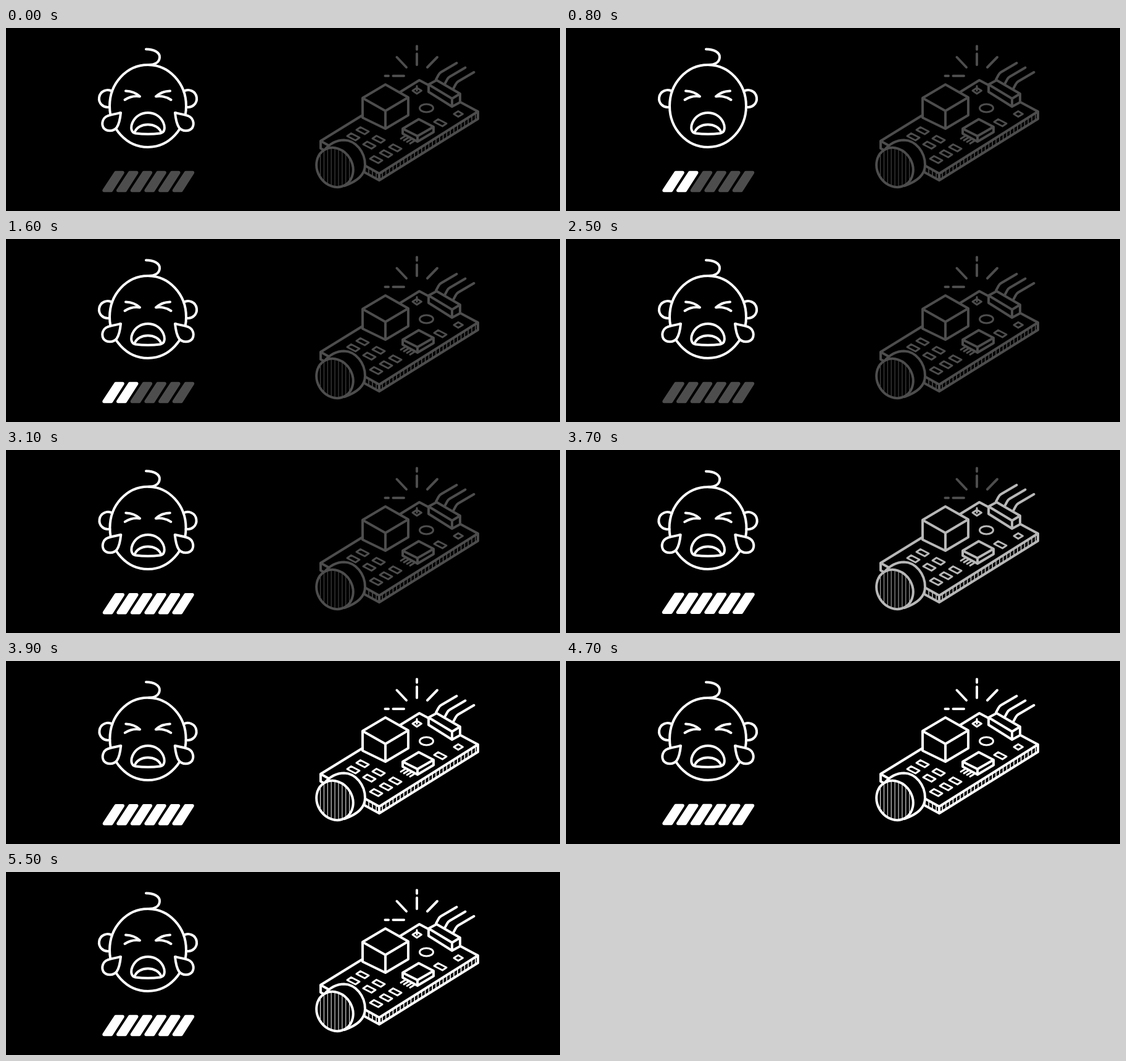
Animation, 898 px wide and 298 px high, one loop 6.9 s. Source, as an HTML page:

```html
<!DOCTYPE html>
<html lang="en">
<head>
<meta charset="utf-8">
<title>Cry detector</title>
<style>
  html, body { margin: 0; width: 100%; height: 100%; overflow: hidden; background: #000; }
  svg { display: block; width: 898px; height: 298px; }
  .line { fill: none; stroke-width: 4; stroke-linecap: round; stroke-linejoin: round; }
  .solid { fill: #000; }
  .thin { stroke-width: 1.6; }
  .hair { stroke-width: 1; }
  .part { stroke-width: 3; }
</style>
</head>
<body>
<svg viewBox="0 0 898 298">
  <defs>
    <ellipse id="micFace" cx="533" cy="227" rx="28.5" ry="33.2" transform="rotate(-30 533 227)"/>
    <clipPath id="micClip"><use href="#micFace"/></clipPath>
    <g id="side">
      <path d="M172 103A14 14 0 1 0 168 128.700"/>
      <path d="M194 102.500Q208 103 217 111.500Q204 109.500 192.500 117"/>
    </g>
    <path id="tear" d="M186 138C185 148 183 157 179.500 162C174 169 163 169 158 162.500C154 155 157 146 165 143C171 141 179 139.500 186 138Z"/>
  </defs>
  <g id="signal">
    <g class="line" stroke="#fff">
      <path d="M227 34.500C240 34.500 250 40 249 48.500C248 56 241 60 231 60"/>
      <ellipse cx="230" cy="127" rx="62" ry="67"/>
      <use href="#side"/>
      <use href="#side" transform="matrix(-1 0 0 1 460 0)"/>
      <path d="M210 171.500C202 170 202 161 205 154C210 143 220 138 230 138S250 143 255 154C258 161 258 170 250 171.500C238 173 222 173 210 171.500Z"/>
      <path d="M208.500 170C214 153 246 153 251.500 170"/>
      <g id="tears" class="solid">
        <use href="#tear"/>
        <use href="#tear" transform="matrix(-1 0 0 1 460 0)"/>
      </g>
    </g>
    <g id="bars" stroke-width="5.500" stroke-linejoin="round"></g>
  </g>
  <g id="sensor" class="line">
    <path d="M510 184L670 85L765 136L605 237ZV196L605 248L765 148V136M605 237V248"/>
    <path id="ticks" class="thin"/>
    <path id="pads" class="part"/>
    <path class="part" d="M659 102L666 97.500L673.500 102L666 107ZM666 94.500V102M726 140L733 135.500L740.500 140L733 144.500Z"/>
    <ellipse class="part" cx="681.500" cy="130.500" rx="11" ry="6.500"/>
    <path class="solid" d="M578 114L615 92L652 113V142L615 164L578 146ZM578 114L615 135M652 113L615 135M615 135V164"/>
    <path class="solid" d="M685 92L698 85L736 107V121L723 128L685 104ZM685 92L723 115M736 107L723 115M723 115V128"/>
    <path id="wires"/>
    <path class="solid" d="M643 164L669 148.500L693 161V169.500L667 185L643 172ZM643 164L667 176M693 161L667 176M667 176V185"/>
    <path id="pins" class="part"/>
    <path class="solid" d="M516 199C526 187 536 182.500 548 182.500C567 183 582 202 582 223C582 239 570 249 549 257"/>
    <use href="#micFace" class="solid"/>
    <path id="grille" class="hair" clip-path="url(#micClip)"/>
  </g>
  <path id="rays" class="line" d="M666 29.500V35M666 42V60M633.500 47.500L649 64M699 47.500L683 64M627.500 78H645M614.500 78H620"/>
</svg>
<script>
const LOOP = 6900, STEP = 100, GRAY = 77;
const OFF = `rgb(${GRAY},${GRAY},${GRAY})`, ON = '#fff';
const el = id => document.getElementById(id);
const repeat = (count, make) => Array.from({ length: count }, (_, i) => make(i));
const setPath = (id, pieces) => el(id).setAttribute('d', pieces.join(''));

const bars = repeat(6, i => {
  const bar = document.createElementNS('http://www.w3.org/2000/svg', 'path');
  bar.setAttribute('d', 'M178 235.5H189L170.500 264.5H159Z');
  bar.setAttribute('transform', `translate(${i * 22.7} 0)`);
  el('bars').append(bar);
  return bar;
});

setPath('ticks', [
  ...repeat(27, i => `M${610 + i * 5.8} ${233.8 - i * 3.66}v11`),
  ...repeat(4, i => `M${582 + i * 6} ${224.4 + i * 3.28}v11`)
]);
const padCentres = [[578, 167], [563, 177], [604, 181], [589, 190.5], [631, 195], [616, 204.5], [600, 214], [704, 154]];
setPath('pads', padCentres.map(([x, y]) => `M${x - 10} ${y - 1}l6.5 -4.5l13.5 7l-6.5 4.5z`));
setPath('wires', repeat(3, i => `M${697 + i * 14} ${84 + i * 7.5}l4 -7.5q1.5 -3 4 -4.5l25.5 -15`));
setPath('pins', repeat(4, i => `M${647 + i * 5} ${176 + i * 2.6}l-7 4.3`));
setPath('grille', repeat(9, i => `M${509.5 + i * 5.9} 190v74`));

// [start time, lit bars]
const levels = [[0, 0], [400, 2], [500, 4], [700, 3], [800, 2], [900, 1], [1000, 2], [1100, 3],
  [1200, 4], [1300, 5], [1400, 4], [1500, 3], [1600, 2], [1800, 1], [2100, 4], [2400, 2],
  [2500, 0], [2700, 2], [2800, 4], [2900, 6]];
const levelAt = t => levels.filter(([start]) => start <= t).pop()[1];

// Damped squash and stretch once the meter is full
function wobble(t) {
  const age = t - 2900;
  if (age <= 0 || age > 1000) return 0;
  return 0.06 * Math.exp(-age / 500) * Math.sin(2 * Math.PI * age / 380);
}

function draw(t) {
  const lit = levelAt(t);
  bars.forEach((bar, i) => {
    const color = i < lit ? ON : OFF;
    bar.setAttribute('fill', color);
    bar.setAttribute('stroke', color);
  });

  const tearsHidden = t >= 700 && t < 2500 && (t + 500) % 1200 < 600;
  el('tears').setAttribute('visibility', tearsHidden ? 'hidden' : 'visible');

  const d = wobble(t);
  el('signal').setAttribute('transform',
    `translate(230 150) scale(${1 + d} ${1 - d / 3}) translate(-230 -150)`);

  const fade = Math.min(1, Math.max(0, (t - 3400) / 500));
  const shade = Math.round(GRAY + (255 - GRAY) * fade);
  el('sensor').setAttribute('stroke', `rgb(${shade},${shade},${shade})`);

  const flash = t >= 5500 || (t >= 3900 && (t - 3900) % 800 < 500);
  el('rays').setAttribute('stroke', flash ? ON : OFF);
}

const begin = performance.now();
function frame() {
  const t = (performance.now() - begin) % LOOP;
  draw(Math.floor(t / STEP) * STEP);
  requestAnimationFrame(frame);
}
draw(0);
requestAnimationFrame(frame);
</script>
</body>
</html>
```
